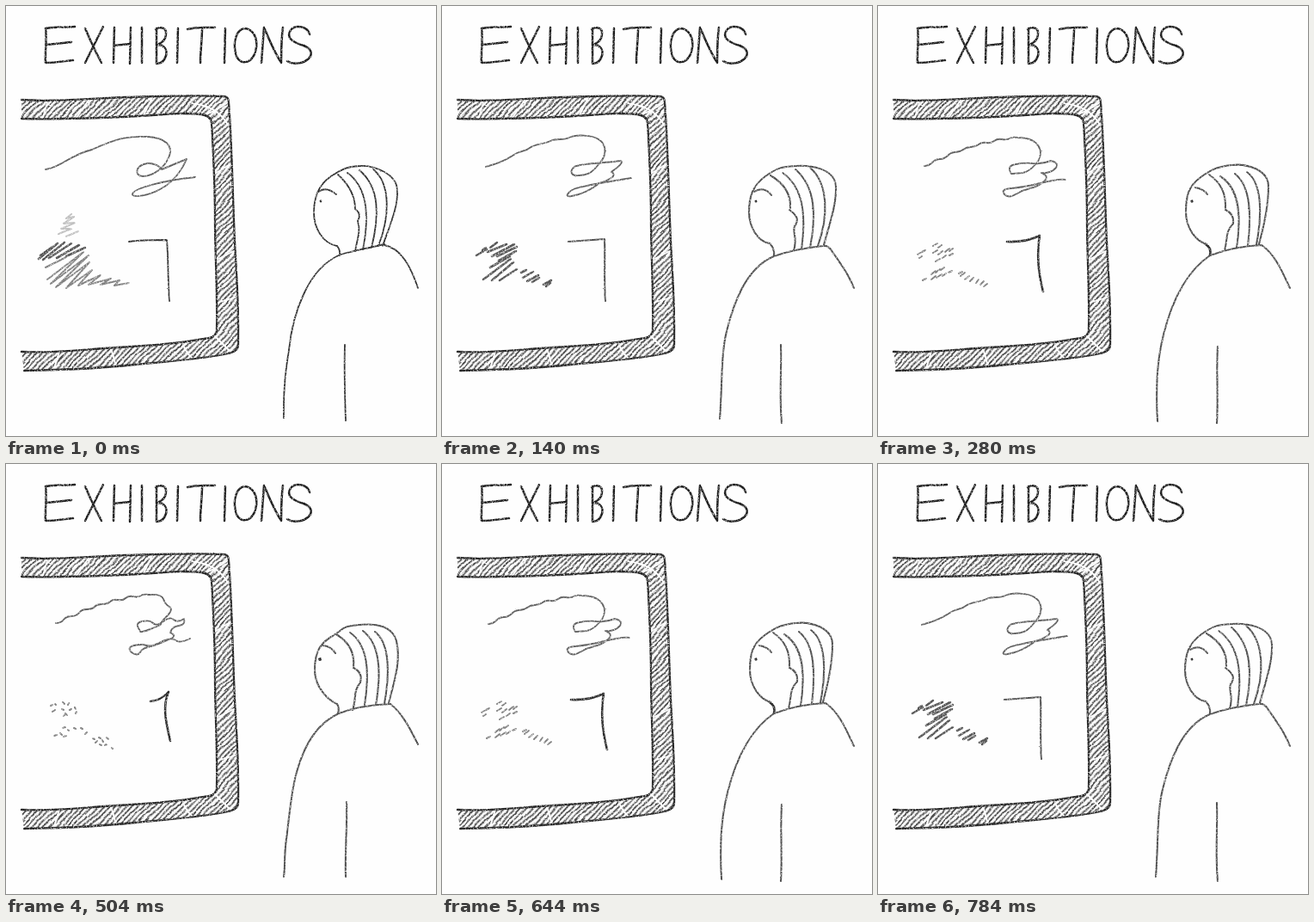
These frames come from a looping animation (500 by 500 pixels, 0.84 s). An HTML page without scripts:

```html
<!DOCTYPE html>
<html lang="en">
<head>
<meta charset="utf-8">
<title>Exhibitions</title>
<style>
  html, body { margin: 0; width: 100%; height: 100%; overflow: hidden; background: #fefefe; }
  svg { display: block; width: 100%; height: 100%; }
  path { fill: none; stroke: #303030; stroke-width: 1.8; stroke-linecap: round; stroke-linejoin: round; }
  .title path { stroke: #1c1c1c; stroke-width: 2.5; }
  .hatch { fill: url(#lines); stroke: none; }
  .gap path { stroke: #fefefe; stroke-width: 1.8; }
  .edge path { stroke: #262626; stroke-width: 2.3; }
  .eye { fill: #222; }
  .rough path { stroke: #505050; stroke-width: 2.1; }
  .pose .swirl { stroke: #606060; stroke-width: 1.9; }
  .pose .bold { stroke: #2c2c2c; stroke-width: 2.6; }
  .pose .pale { stroke: #c0c0c0; stroke-width: 2.2; }
  .pose .mid { stroke: #808080; stroke-width: 2; }
  .pose .dark { stroke: #555; stroke-width: 2.6; }

  /* four poses, played forwards and back again */
  .pose { visibility: hidden; animation: 840ms step-end infinite; }
  .crisp { animation-name: crisp; }
  .loose { animation-name: loose; }
  .broken { animation-name: broken; }
  .dotted { animation-name: dotted; }
  @keyframes crisp { 0% { visibility: visible } 16.66%, 100% { visibility: hidden } }
  @keyframes loose { 0%, 33.33% { visibility: hidden } 16.66%, 83.33%, 100% { visibility: visible } }
  @keyframes broken { 0%, 50%, 83.33%, 100% { visibility: hidden } 33.33%, 66.66% { visibility: visible } }
  @keyframes dotted { 0%, 66.66%, 100% { visibility: hidden } 50% { visibility: visible } }
</style>
</head>
<body>
<svg viewBox="0 0 500 500" role="img" aria-label="Exhibitions">
  <defs>
    <filter id="pencil" filterUnits="userSpaceOnUse" x="0" y="0" width="500" height="500" color-interpolation-filters="sRGB">
      <feTurbulence type="fractalNoise" baseFrequency=".6" numOctaves="2" seed="4" result="noise"/>
      <feDisplacementMap in="SourceGraphic" in2="noise" scale="1.4" xChannelSelector="R" yChannelSelector="G" result="line"/>
      <feColorMatrix in="noise" values="0 0 0 0 0  0 0 0 0 0  0 0 0 0 0  0 0 0 2.4 -.25" result="grain"/>
      <feComposite in="line" in2="grain" operator="in"/>
    </filter>
    <filter id="wobble" filterUnits="userSpaceOnUse" x="0" y="0" width="500" height="500" color-interpolation-filters="sRGB">
      <feTurbulence type="fractalNoise" baseFrequency=".04" numOctaves="2" seed="9" result="noise"/>
      <feDisplacementMap in="SourceGraphic" in2="noise" scale="6" xChannelSelector="R" yChannelSelector="G"/>
    </filter>
    <pattern id="lines" width="19" height="60" patternUnits="userSpaceOnUse" patternTransform="rotate(44)">
      <path d="M2 0V60M7 0L6.6 60M11.5 0L11.9 60M16.6 0V60" style="stroke:#404040;stroke-width:1.9"/>
    </pattern>
    <clipPath id="border">
      <path d="M18 109C60 112 100 107 140 106S215 103 252 105Q259 105 259 112C262 150 263 190 265 250S271 330 270 394Q270 402 258 404C235 410 200 412 150 417S70 423 21 424L18 402C60 404 90 398 130 397S205 392 236 386Q245 384 245 376C246 330 243 290 243 250S241 170 239 136Q238 127 226 126C205 125 195 126 170 127S70 132 18 131Z"/>
    </clipPath>
  </defs>

  <g class="title" filter="url(#pencil)">
    <path d="M80 24C68 25 57 24 46 26C48 40 45 53 46 66C58 66 68 64 78 63M47 45L76 42"/>
    <path d="M92 26C98 40 104 53 111 66M113 24C106 38 99 52 92 66"/>
    <path d="M126 25L125 66M145 25L144 67M126 46L144 44"/>
    <path d="M158 25V66"/>
    <path d="M175 26V67M174 27C181 23 187 26 186 33C186 39 181 43 176 45C184 45 188 51 186 58C184 64 180 67 175 67"/>
    <path d="M200 26L199 66"/>
    <path d="M211 27C222 24 232 25 243 25M228 26C228 40 226 53 226 66"/>
    <path d="M255 26L254 66"/>
    <path d="M278 26C267 27 264 43 267 55C270 68 283 69 289 56C294 43 291 28 278 26Z"/>
    <path d="M297 66C298 52 299 39 300 25C306 39 312 54 320 66C320 53 320 39 322 25"/>
    <path d="M353 33C351 24 337 21 331 28C325 37 334 42 343 45C354 48 358 55 352 61C345 68 333 68 327 64"/>
  </g>

  <g filter="url(#pencil)">
    <g clip-path="url(#border)">
      <g filter="url(#wobble)">
        <path class="hatch" d="M0 90H290V440H0Z"/>
      </g>
      <g class="gap">
        <path d="M216 113C235 116 248 121 258 138M232 126C246 121 252 116 258 112"/>
        <path d="M97 108L82 130M170 106L160 127M48 112L43 130"/>
        <path d="M241 196L264 182M243 296L267 284M246 345L269 338"/>
        <path d="M206 393C208 402 214 407 218 411M122 398L128 419M62 402L56 422M242 383L262 403"/>
      </g>
    </g>
    <g class="edge">
      <path d="M18 109C60 112 100 107 140 106S215 103 252 105Q259 105 259 112C262 150 263 190 265 250S271 330 270 394Q270 402 258 404C235 410 200 412 150 417S70 423 21 424"/>
      <path d="M18 131C60 132 130 130 170 127S205 125 226 126Q238 127 239 136C241 170 243 210 243 250S246 330 245 376Q245 384 236 386C205 392 170 395 130 397S60 404 18 402"/>
    </g>
  </g>

  <g class="pose crisp" filter="url(#pencil)">
    <path class="swirl" d="M46 190C66 187 72 174 100 167C126 155 140 151 164 152C186 153 194 163 190 174C185 188 171 198 159 198C150 197 150 188 160 184C168 181 178 185 181 190L210 178C206 188 196 204 181 212C166 221 148 223 147 219C148 211 190 202 220 199"/>
    <path d="M143 274C157 272 172 272 187 272C189 295 188 318 190 343"/>
    <path class="pale" d="M76 242L70 247L79 245L67 253L80 252L64 259L76 259L61 265M70 268L84 262"/>
    <path class="dark" d="M38 294L60 276M43 295L68 275M50 293L76 276M59 293L85 278M70 291L92 281M40 290L54 280"/>
    <path class="mid" d="M46 304L70 292M48 318L90 286L52 323L96 290L58 327L97 298L70 328L100 307L84 325L110 313L96 324L122 317L110 324L132 319L126 325L143 322"/>
    <path d="M385 279Q389 284 388 290M385 279C368 276 358 258 358 240S363 208 378 198S398 187 411 186S454 193 455 214S445 258 438 279"/>
    <path d="M362 217C369 211 377 213 384 219M386 196C399 208 406 220 406 236Q414 242 409 250C413 262 408 272 406 285"/>
    <path d="M397 194C422 212 422 248 415 283M411 191C435 211 434 245 425 281M427 190C448 207 446 246 433 279"/>
    <path d="M440 277C405 285 399 286 389 289C350 305 333 360 329 400Q322 440 323 479M440 278C460 282 471 304 479 328M394 394C393 425 394 453 395 482"/>
    <circle class="eye" cx="366" cy="227" r="1.4"/>
  </g>

  <g class="pose rough loose" filter="url(#pencil)">
    <path class="swirl" d="M51 187C62 184 72 181 82 174S96 170 102 165S118 161 126 157S140 157 148 153S174 150 182 155S193 171 184 182S172 196 160 197S149 191 154 187S186 183 208 180C212 182 202 189 197 193C206 197 191 204 183 206C172 215 161 219 151 221S147 216 153 213S195 204 220 200"/>
    <path d="M147 274L189 271C190 295 188 319 190 343"/>
    <path class="dark" d="M40 290L52 283M47 284L51 281M56 281L64 275M53 286L75 277M58 291L84 277M64 291L87 280M66 296L86 285M56 304L79 291M48 318L80 294M58 319L83 298M67 319L87 306"/>
    <path class="dark" d="M92 310L98 307M94 316L106 309M99 320L112 313M105 321L113 316M118 324L127 319M121 326L126 322"/>
    <path d="M386 291Q387 282 381 276C367 274 357 257 357 239S362 208 376 198S395 187 411 186S457 188 458 210S449 258 444 278"/>
    <path d="M363 216C370 211 378 213 383 220M382 197C397 206 406 219 405 235M404 237C412 243 416 248 410 256C407 264 414 269 409 284"/>
    <path d="M396 194C422 212 423 248 418 283M411 190C435 211 435 245 428 281M428 188C450 207 449 246 437 279"/>
    <path d="M386 291C405 284 425 281 443 279Q448 278 452 283C462 298 472 309 479 328M386 291C352 305 338 350 331 378S326 444 323 480M394 394C395 425 392 453 395 485"/>
    <circle class="eye" cx="365" cy="227" r="1.5"/>
  </g>

  <g class="pose rough broken" filter="url(#pencil)">
    <path class="swirl" d="M54 186q5 0 9-4t9-4 9-4 9-4 9-3 9-3 9-3 9-2 9-2 9-2 9-1 9-1C188 153 194 170 185 182Q176 193 168 194T155 195Q149 186 160 184T181 183T201 180Q212 183 206 189T190 194Q200 198 193 204T177 212T160 219T147 219Q142 213 155 212T180 208T203 203T218 202"/>
    <path class="bold" d="M150 274Q172 275 188 267C184 291 187 313 192 332"/>
    <path class="mid" d="M46 289l5-3M48 293l3-2M51 286l4-2M64 279l5-3M70 281l4-3M64 287l5-3M70 289l5-4M67 297l5-3M75 293l4-3M78 286l5-4M83 285l4-3M83 290l4-2"/>
    <path class="mid" d="M52 319l4-2M62 312l5-4M67 310l5-4M73 307l4-3M62 318l5-4M68 316l6-4M75 314l4-3M82 310l4-2M94 311l4-2M96 314l5-4M101 318l5-4M107 320l4-4M114 322l3-4M119 324l4-4M123 326l4-3"/>
    <path d="M382 277C369 273 358 258 358 239S362 209 374 200S393 187 411 185S454 190 454 210S449 255 443 277"/>
    <path class="bold" d="M381 277Q388 281 386 290"/>
    <path d="M369 211Q379 213 383 219M385 196C399 206 405 218 404 237Q414 241 413 253C403 263 407 272 403 284"/>
    <path d="M398 198C422 213 422 248 417 281M415 195C434 210 434 245 430 279M429 193C448 207 446 246 440 278"/>
    <path d="M386 290C405 283 425 279 446 278C462 289 470 309 479 328M386 290C354 312 340 350 332 382S323 444 325 483M395 396C393 425 396 453 394 485"/>
    <circle class="eye" cx="365" cy="227" r="1.7"/>
  </g>

  <g class="pose rough dotted" filter="url(#pencil)">
    <path class="swirl" d="M58 185q6 0 9-4t9-4 9-4 9-4 9-3 9-3 9-3 9-2 9-2 9-2 9-1 9-1Q181 151 183 157T190 166T187 177T180 186T168 192T156 194Q149 185 158 183T171 185T183 183T195 181T207 180Q209 187 201 188T191 196Q199 200 192 203T178 209T165 213T156 219T146 219Q140 213 149 211T163 211T180 207T197 205T214 203"/>
    <path class="bold" d="M168 276Q180 275 189 265C181 283 187 304 191 322"/>
    <path class="mid" d="M52 281l2-1M57 279l1 1M66 277l2 2M72 280l1-2M54 288l3-2M65 285l2 1M69 290l2 2M74 286l2-1M80 283l1 2M81 290l1-2M67 293l1-1"/>
    <path class="mid" d="M56 316l3-1M63 313l2 2M66 307l3-1M72 309l1 1M67 317l3-1M79 307l2 1M87 307l2 1M92 314l2-2M101 319l2 1M104 324l2-2M108 318l2 1M112 321l1 2M117 318l2 2M115 327l2-1M123 330l1 1M109 326l2 1"/>
    <path d="M386 290Q388 284 385 279C373 274 359 258 359 240S363 210 378 201S390 190 402 188S448 182 454 206S450 257 445 278"/>
    <path d="M369 211Q378 212 383 220M384 198C399 207 406 219 404 237Q415 242 412 254C403 265 408 273 403 286"/>
    <path d="M400 196C423 212 422 248 417 280M415 194C436 210 436 246 430 280M429 195C447 209 446 246 440 279"/>
    <path d="M387 290C405 283 425 280 447 279C461 290 470 308 479 326M387 290C358 303 345 333 338 358S329 415 326 436S325 465 323 480M396 393C397 420 394 450 395 480"/>
    <circle class="eye" cx="365" cy="227" r="2"/>
  </g>
</svg>
</body>
</html>
```
